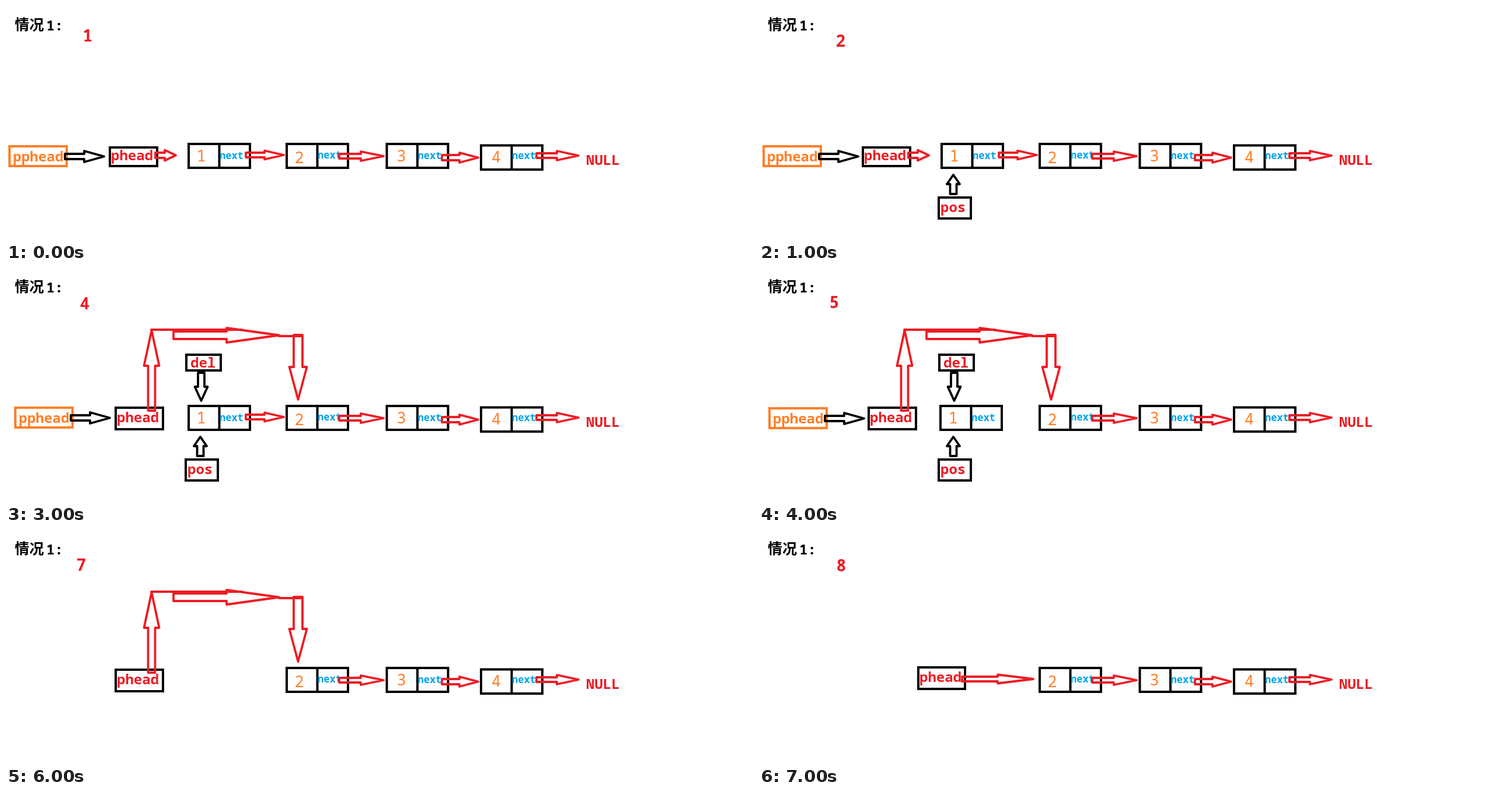
These frames come from a looping animation (1280 px wide and 402 px high, 9 s). An HTML page:

```html
<!DOCTYPE html>
<html lang="zh">
<head>
<meta charset="utf-8">
<title>Linked list deletion</title>
<style>
  html, body { margin: 0; width: 100%; height: 100%; overflow: hidden; background: #fff; }
  svg { display: block; font: 600 24px "Noto Sans Mono", "DejaVu Sans Mono", monospace; }
  .next { font-size: 17px; }
  .value { font-size: 27px; font-weight: 500; text-anchor: middle; }
  .count { font-size: 28px; text-anchor: middle; }
  .title { font: 700 25px "Noto Sans CJK SC", "Noto Sans CJK", sans-serif; }
</style>
</head>
<body>
<svg id="stage" width="1280" height="402" viewBox="0 0 1280 402"></svg>
<script>
const BLACK = '#000', RED = '#ed1c24', ORANGE = '#ff7f27', BLUE = '#00a2e8';
const stage = document.getElementById('stage');

const text = (s, x, y, color, cls = '') =>
  `<text x="${x}" y="${y}" fill="${color}" class="${cls}">${s}</text>`;
const path = (d, color, width = 4) =>
  `<path d="${d}" fill="none" stroke="${color}" stroke-width="${width}" stroke-linejoin="round" stroke-linecap="round"/>`;
const box = (x1, y1, x2, y2, color = BLACK) =>
  `<rect x="${x1}" y="${y1}" width="${x2 - x1}" height="${y2 - y1}" fill="none" stroke="${color}" stroke-width="4"/>`;
const move = (dx, dy, content) => `<g transform="translate(${dx} ${dy})">${content}</g>`;

// Outlined arrow starting at (x, y): shaft length, full length, half widths, direction.
const arrow = (x, y, shaft, length, half, head, color = RED, angle = 0) =>
  `<g transform="translate(${x} ${y}) rotate(${angle})">` +
  path(`M0 ${-half}H${shaft}V${-head}L${length} 0L${shaft} ${head}V${half}H0Z`, color, 3.8) + '</g>';

const node = (value, x, y, valueY, nextY, bottom = 278) =>
  box(x, y, x + 105, bottom) + path(`M${x + 52.5} ${y}V${bottom}`, BLACK) +
  text(value, x + (value === 3 ? 25 : 21.5) + (value === 4 ? 4.5 : 0), valueY, ORANGE, 'value') +
  text('next', x + 53, nextY, BLUE, 'next');

const title = text('情况', 15, 41, BLACK, 'title') + text('1:', 69, 42, BLACK);
const firstNode = node(1, 313, 237, 267, 263);
const firstArrow = arrow(411, 256, 32, 65, 4, 7.5);
const tail =
  node(2, 481, 237, 270, 262) + arrow(571, 258, 37, 76, 4, 8) +
  node(3, 652.5, 237, 267, 263) + arrow(747, 260.5, 30, 62, 4.5, 8.5) +
  node(4, 814, 239.5, 269, 263, 281) + arrow(909, 257, 35, 72, 4, 8) +
  text('NULL', 994, 273, RED);

const pphead = (dx, dy) => move(dx, dy,
  box(6, 241, 104, 275, ORANGE) + text('pphead', 12, 267, ORANGE) +
  arrow(101, 258.5, 33, 67, 4.5, 9.5, BLACK));

const shortHead = box(178, 243, 259, 275) + text('phead', 180, 265, RED) +
  arrow(256, 256.5, 16, 35, 4.5, 9);
const detourHead =
  box(188, 240, 269, 277) + text('phead', 190, 265, RED) +
  arrow(249.5, 245, 77, 138, 6, 13, RED, -90) +
  path('M249 106H404M468 117H508', RED) +
  arrow(287, 115.5, 91, 181, 6.5, 12.5) +
  arrow(500.5, 115, 55, 111, 7.5, 15, RED, 90);
const directHead = box(273, 236, 353, 273) + text('phead', 275, 261, RED) +
  arrow(348, 256, 61, 122, 4, 7.5);

const delArrow = arrow(334.5, 180, 24, 48, 5.5, 11, BLACK, 90);
const delFirst = box(313, 146, 369, 177) + text('del', 316, 170, RED) + delArrow;
const delLater = box(309, 149, 368, 176) + text('del', 316, 171, RED) + delArrow;
const pos = box(308, 329, 363, 365) + text('pos', 311, 354, RED) +
  arrow(333, 323, 17, 33, 5.5, 11, BLACK, -90);

const count = (n, x, y) => text(n, x, y, RED, 'count');
const first = firstNode + firstArrow;
const pointers = delLater + pos;

const scenes = [
  count(1, 140, 61) + pphead(0, 0) + shortHead + first,
  count(2, 140, 70) + pphead(2, 0) + shortHead + first + pos,
  count(3, 147, 70) + pphead(0, 0) + shortHead + first + delFirst + move(2, 1, pos),
  count(4, 135, 71) + pphead(10, -1) + detourHead + first + pointers,
  count(5, 129, 69) + pphead(12, 0) + detourHead + move(-2, 0, firstNode) + pointers,
  count(6, 129, 72) + pphead(12, 0) + detourHead + pointers,
  count(7, 129, 70) + detourHead,
  count(8, 141, 71) + directHead
];

let shown = -1;
function draw() {
  const step = Math.min(7, Math.floor(performance.now() % 9000 / 1000));
  if (step !== shown) {
    stage.innerHTML = title + tail + scenes[step];
    shown = step;
  }
  requestAnimationFrame(draw);
}
draw();
</script>
</body>
</html>
```
